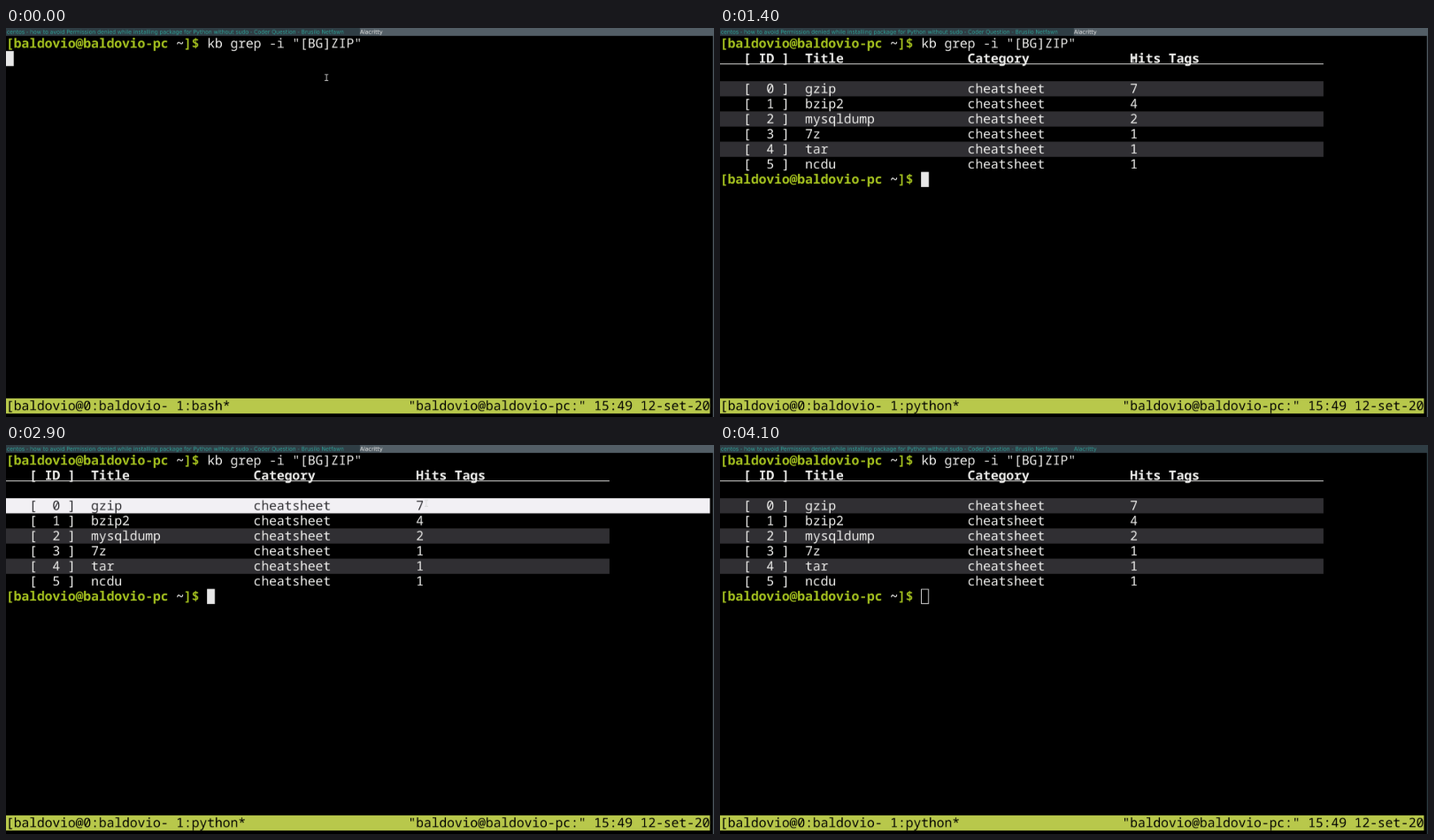
Write an HTML page with a canvas that moves like this. It is 800 by 440 pixels and loops after 4.6 s.

```html
<!DOCTYPE html>
<html lang="en">
<head>
<meta charset="utf-8">
<title>Terminal search</title>
<style>
html, body { margin: 0; width: 100%; height: 100%; overflow: hidden; background: #000; }
canvas { display: block; }
</style>
</head>
<body>
<canvas id="stage" width="800" height="440"></canvas>
<script>
const LOOP = 4600, STEP = 100;

// The desktop is drawn at full size, then shrunk onto the stage.
const WIDTH = 1922, HEIGHT = 1057, SCALE = 800 / WIDTH;
const CELL_W = 21, CELL_H = 41, TOP = 22, BASELINE = 32;
const COLS = 91, TABLE_COLS = 78;
const MONO = '35px "Noto Sans Mono", "DejaVu Sans Mono", monospace';
const TITLE_FONT = '14.67px "DejaVu Sans", sans-serif';

const stage = document.getElementById('stage').getContext('2d');
const desktop = document.createElement('canvas');
desktop.width = WIDTH;
desktop.height = HEIGHT;
const ctx = desktop.getContext('2d');
ctx.textRendering = 'geometricPrecision';
stage.imageSmoothingQuality = 'high';

const BLACK = '#000', WHITE = '#eeeeec', STRIPE = '#302f33', SELECTED = '#f2f0f4';
const CURSOR = '#e8e8e8', POINTER_COLOR = '#d8d8d8';
const GREEN = '#a6c31f', STATUS = '#b8c84b';
const BAR = '#2f3d44', BAR_ACTIVE = '#535e66', BAR_TEXT = '#2fa198';

const USER = 'baldovio', HOST = USER + '-pc';
const PAGE_TITLE = 'centos - how to avoid Permission denied while installing package ' +
  'for Python without sudo - Coder Question - Brusilo Netfawn';
const ROWS = [['gzip', 7], ['bzip2', 4], ['mysqldump', 2], ['7z', 1], ['tar', 1], ['ncdu', 1]];

// Pointer stops: time, x, y in stage pixels.
const POINTER = [
  [0, 362, 56], [800, 362, 56], [1400, 467, 36], [1700, 492, 35],
  [2000, 488, 52], [2300, 475, 66], [3300, 475, 66], [3600, 88, 5]
];

const rowY = row => TOP + row * CELL_H;

function fill(x, y, w, h, color) {
  ctx.fillStyle = color;
  ctx.fillRect(x, y, w, h);
}

function fillCells(col, row, count, color) {
  fill(col * CELL_W, rowY(row), count * CELL_W, CELL_H, color);
}

function put(col, row, text, color = WHITE, bold = false) {
  ctx.font = (bold ? 'bold ' : '') + MONO;
  ctx.fillStyle = color;
  ctx.fillText(text, col * CELL_W, rowY(row) + BASELINE);
}

function prompt(row) {
  const head = `[${USER}@${HOST} `;
  put(0, row, head, GREEN, true);
  put(head.length, row, '~', WHITE, true);
  put(head.length + 1, row, ']$', GREEN, true);
}

function titleBar(focused) {
  const half = WIDTH / 2;
  fill(0, 0, WIDTH, TOP, BAR);
  if (focused) fill(half, 0, half, TOP, BAR_ACTIVE);
  fill(WIDTH - 3, TOP, 3, HEIGHT - TOP, focused ? BAR_ACTIVE : BAR);
  ctx.font = TITLE_FONT;
  ctx.fillStyle = BAR_TEXT;
  ctx.fillText(PAGE_TITLE, 2, 16);
  ctx.fillStyle = focused ? WHITE : BAR_TEXT;
  ctx.fillText('Alacritty', half, 16);
}

function table(selection) {
  const headings = [[3, '[ ID ]'], [11, 'Title'], [32, 'Category'], [53, 'Hits'], [58, 'Tags']];
  headings.forEach(([col, text]) => put(col, 1, text, WHITE, true));
  fill(0, rowY(1) + 34, TABLE_COLS * CELL_W, 2, WHITE);

  ROWS.forEach(([name, hits], i) => {
    const row = i + 3;
    const picked = i === 0 ? selection : '';
    if (i % 2 === 0) fillCells(0, row, TABLE_COLS, STRIPE);
    if (picked === 'line') fillCells(0, row, COLS, SELECTED);
    if (picked === 'word') fillCells(53, row, 2, SELECTED);
    const color = picked === 'line' ? STRIPE : WHITE;
    put(3, row, `[  ${i} ]`, color);
    put(11, row, name, color);
    put(32, row, 'cheatsheet', color);
    put(53, row, String(hits), picked ? STRIPE : WHITE);
  });
}

function cursor(col, row, focused) {
  if (focused) return fillCells(col, row, 1, CURSOR);
  ctx.strokeStyle = CURSOR;
  ctx.lineWidth = 2;
  ctx.strokeRect(col * CELL_W + 1, rowY(row) + 1, CELL_W - 2, CELL_H - 2);
}

function statusBar(command) {
  const right = `"${USER}@${HOST}:" 15:49 12-set-20`;
  fillCells(0, 24, COLS, STATUS);
  put(0, 24, `[${USER}@0:${USER}- 1:${command}*`, BLACK);
  put(COLS - right.length, 24, right, BLACK);
}

function pointer(t) {
  const last = POINTER[POINTER.length - 1];
  if (t > last[0]) return;
  const next = POINTER.findIndex(stop => stop[0] >= t);
  const b = POINTER[next], a = POINTER[Math.max(0, next - 1)];
  const k = a === b ? 0 : (t - a[0]) / (b[0] - a[0]);
  const x = Math.round((a[1] + (b[1] - a[1]) * k) / SCALE);
  const y = Math.round((a[2] + (b[2] - a[2]) * k) / SCALE);
  fill(x - 1, y - 9, 2, 18, POINTER_COLOR);
  fill(x - 5, y - 9, 10, 2, POINTER_COLOR);
  fill(x - 5, y + 7, 10, 2, POINTER_COLOR);
}

function draw(time) {
  const t = Math.floor((time % LOOP) / STEP) * STEP;
  const focused = t < 3600;
  const selection = t < 2500 || t >= 3000 ? '' : t < 2600 ? 'word' : 'line';

  fill(0, 0, WIDTH, HEIGHT, BLACK);
  titleBar(focused);
  prompt(0);
  put(26, 0, 'kb grep -i "[BG]ZIP"');
  if (t >= 300) {
    table(selection);
    prompt(9);
    cursor(26, 9, focused);
  } else {
    cursor(0, 1, true);
  }
  statusBar(t < 100 ? 'bash' : 'python');
  pointer(t);
  stage.drawImage(desktop, 0, 0, 800, 440);
}

const start = performance.now();
function tick() {
  draw(performance.now() - start);
  requestAnimationFrame(tick);
}
draw(0);
requestAnimationFrame(tick);
</script>
</body>
</html>
```
